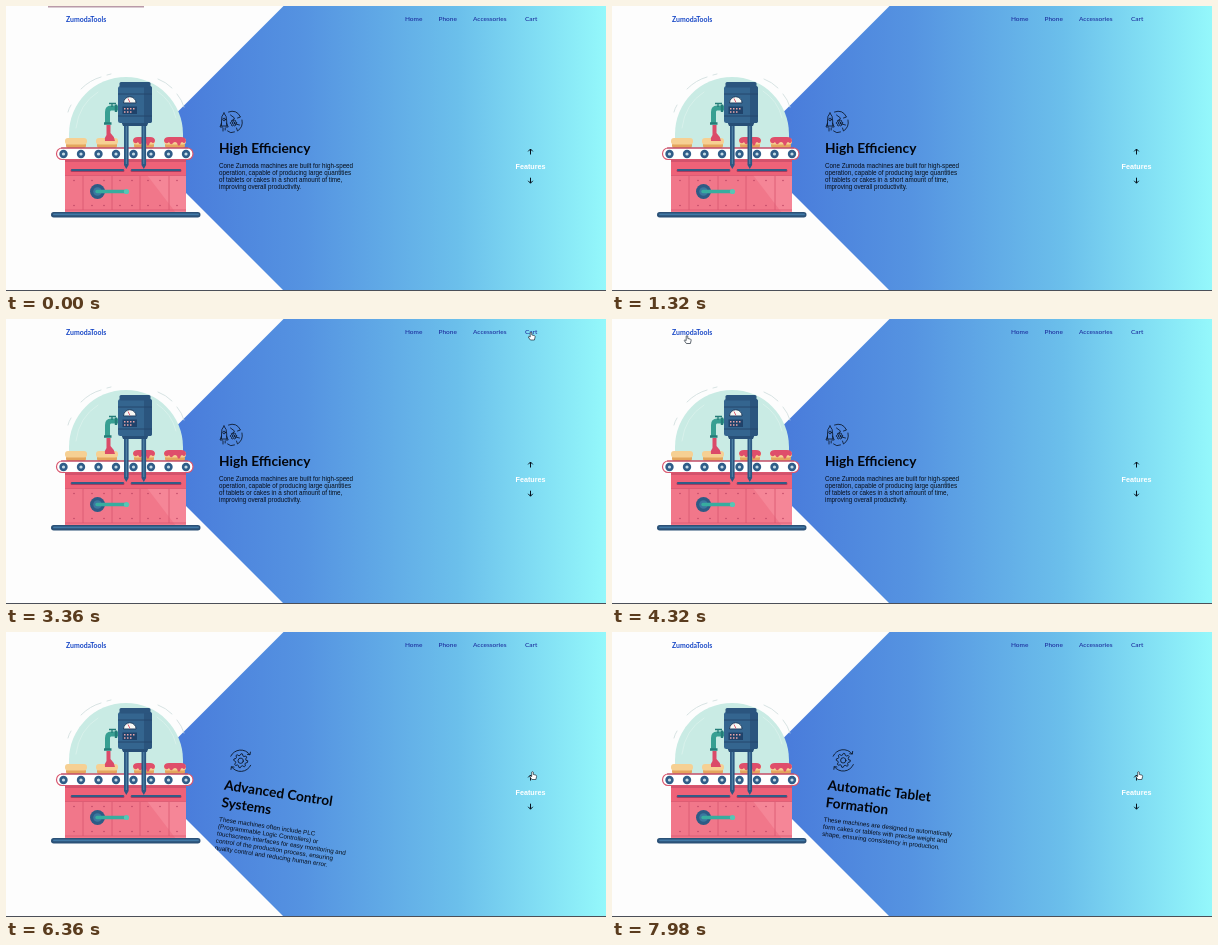
An HTML page for the animation above (8000 ms loop, 600 px wide and 285 px high).

```html
<!DOCTYPE html>
<html lang="en">
<head>
<meta charset="utf-8">
<title>Product features</title>
<style>
  html, body { margin: 0; width: 100%; height: 100%; overflow: hidden; background: #fdfdfd; }
  svg { display: block; width: 100%; height: 100%; }
  text { white-space: pre; }
  .brand, .nav, .head { font-family: Lato, "Open Sans", sans-serif; }
  .brand { font-size: 6.9px; font-weight: 700; fill: #1747c6; }
  .nav { font-size: 6.5px; fill: #1b2c9c; font-weight: 500; }
  .head { font-size: 13.700px; font-weight: 700; fill: #03060c; }
  .body { font: 6.28px "Liberation Sans", Arial, sans-serif; fill: #060d18; }
  .label { font: 700 7.2px "Liberation Sans", Arial, sans-serif; fill: #fff; }
  .icon { fill: none; stroke: #081220; stroke-width: .8; stroke-linecap: round; stroke-linejoin: round; }
  .arrow { fill: none; stroke: #07121e; stroke-width: 1; }
</style>
</head>
<body>
<svg viewBox="0 0 600 285" preserveAspectRatio="none">
  <defs>
    <linearGradient id="sky" gradientUnits="userSpaceOnUse" x1="136" x2="600" y1="0" y2="0">
      <stop offset="0" stop-color="#4675d9"/>
      <stop offset=".35" stop-color="#5593e1"/>
      <stop offset=".68" stop-color="#6bbfeb"/>
      <stop offset="1" stop-color="#94f8fb"/>
    </linearGradient>
    <clipPath id="wedge"><path d="M135.250 142.250L277.500 0H600V285H278Z"/></clipPath>
  </defs>

  <rect width="600" height="285" fill="#fdfdfd"/>
  <path d="M135.250 142.250L277.500 0H600V285H278Z" fill="url(#sky)"/>
  <g clip-path="url(#wedge)">
    <g transform="translate(136 142.5)"><g id="wheel"></g></g>
  </g>

  <g id="machine">
    <g fill="none" stroke="#cfdcdc" stroke-width=".8" stroke-linecap="round">
      <path d="M75 83Q84 74 95 71M101 69l4-1M152 73q8 3 14 9M171 88q5 6 7 13M62 106q1-4 3-7"/>
    </g>
    <path d="M63 143V128A57 57 0 0 1 177 128V143Z" fill="#c9ebe4"/>
    <path d="M70 122Q73 98 92 86M151 85Q166 95 170 112" fill="none" stroke="#d8f1eb" stroke-width="1" stroke-linecap="round"/>
    <g id="cakes"></g>

    <rect x="59" y="152" width="121" height="55" fill="#ee6278"/>
    <rect x="59" y="169" width="121" height="38" fill="#f1778a"/>
    <path d="M141 169H180V207H170Z" fill="#f58697"/>
    <path d="M59 152H180V156H59Z" fill="#d3526c"/>
    <path d="M59 169.500H180M59 204H180M77 170V204M106 170V204M134 170V204M163 170V204" stroke="#d9576f" stroke-width=".8"/>
    <g id="rivets" fill="#b53f5f"></g>
    <path d="M66 164.500H117M126 164.500H174" stroke="#a83c60" stroke-width="3" stroke-linecap="round"/>
    <path d="M66 164H117M126 164H174" stroke="#315c86" stroke-width="1.800" stroke-linecap="round"/>

    <rect x="50.500" y="142" width="136.500" height="11.500" rx="5.700" fill="#fff" stroke="#d9566e" stroke-width="1.200"/>
    <path d="M55 142H182" stroke="#b94a66" stroke-width="1.200"/>
    <g id="rollers"></g>

    <rect x="45" y="206" width="149.500" height="5.500" rx="2.700" fill="#2b5177"/>
    <path d="M48 208.400H192" stroke="#4279a6" stroke-width="1.800" stroke-linecap="round"/>

    <circle cx="91.500" cy="185.500" r="7.500" fill="#2d5b85"/>
    <circle cx="91.500" cy="185.500" r="4.300" fill="#3c779f"/>
    <path d="M91 185.500H120" stroke="#37ad9f" stroke-width="3.400" stroke-linecap="round"/>
    <circle cx="120.500" cy="185.500" r="2.600" fill="#57c6b5"/>

    <path d="M114 102H105Q101.500 102 101.500 106V118" fill="none" stroke="#389f92" stroke-width="5"/>
    <path d="M98 117.500H105.500M110 98.500V106" stroke="#247c78" stroke-width="2.400"/>
    <path d="M106 101V97.500M103 97.500H110" stroke="#247c78" stroke-width="1.300"/>
    <path d="M100.500 119H104.500V127Q108 130 109 135H99Q98 132 100.500 129Z" fill="#db4a69"/>

    <path d="M118 118H122.600V159L120.300 163L118 159ZM135.500 118H140.100V159L137.800 163L135.500 159Z" fill="#2c5882"/>
    <path d="M120.300 119V158M137.800 119V158" stroke="#5b8fb0" stroke-width=".9"/>
    <path d="M115 115H143L141 120H117Z" fill="#274f77"/>
    <rect x="112" y="80" width="34" height="37" rx="2.500" fill="#34658f"/>
    <path d="M138 80H144Q146 80 146 83V114Q146 117 144 117H138Z" fill="#2b557e"/>
    <rect x="113.500" y="76" width="31" height="5.500" rx="1.500" fill="#2b557e"/>
    <path d="M112 88H146M112 110H146" stroke="#24476d" stroke-width="1"/>
    <path d="M117.500 97A6.300 6.300 0 0 1 130.100 97Z" fill="#f7f8f4" stroke="#1f3e60" stroke-width="1"/>
    <path d="M124 96.500L122 92.500" stroke="#d84c66" stroke-width=".9"/>
    <rect x="116.500" y="100.500" width="14.500" height="7.500" fill="#1f426a"/>
    <path d="M118 102.700H130M118 106H127" stroke="#e9a6aa" stroke-width="1.500" stroke-dasharray="1.500 1.500"/>
  </g>

  <text class="brand" x="60" y="15.500">ZumodaTools</text>
  <g id="nav"></g>

  <text class="label" x="509.500" y="163.300">Features</text>
  <path class="arrow" d="M524.500 148.500V143M522.200 145.400L524.500 143L526.800 145.400"/>
  <path class="arrow" d="M524.500 171.700V177.200M522.200 174.800L524.500 177.200L526.800 174.800"/>

  <path d="M0 284.500H600" stroke="#4b4f58"/>
  <path id="edge" d="M42 .8H138" stroke="#b99aa8" stroke-width="1.500"/>

  <g id="cursor">
    <path id="pointer" d="M0 0V6L1.400 4.800L2.400 6.900L3.400 6.400L2.500 4.400H4.200Z" fill="#fff" stroke="#34495c" stroke-width=".6"/>
    <path id="hand" d="M-.8 .6Q0-.4.800.6V3L3.500 3.600Q4.300 4 4.100 5L3.400 8H-.6L-2.800 5Q-2.600 3.900-.8 5Z" fill="#fff" stroke="#1c2733" stroke-width=".7"/>
  </g>
</svg>

<script>
const LOOP = 8000, TICK = 60, TURN = 700;
const $ = id => document.getElementById(id);
const fill = (id, html) => { $(id).innerHTML = html; };

const gear = (r, teeth) => {
  const points = [];
  for (let i = 0; i < teeth * 4; i++) {
    const a = (i - .5) / (teeth * 4) * 2 * Math.PI;
    const d = i % 4 < 2 ? r : r * .76;
    points.push(`${(d * Math.cos(a)).toFixed(2)},${(d * Math.sin(a)).toFixed(2)}`);
  }
  return `<polygon points="${points.join(' ')}"/><circle r="${r * .38}"/>`;
};

const icons = {
  rocket: `<path d="M-7.500-9Q-4.500-6-4.800-1V4H-10V-1Q-10.500-6-7.500-9ZM-10 1L-11.500 5H-9M-5 1L-3.300 5H-5.500M-8.500 6V9M-6.300 6V8"/>
    <circle cx="-7.400" cy="-2.500" r="1.300"/>
    <path d="M-3-10Q5-13 9-5L6-4M10.500-2Q12 5 6 9L5 6M3 10Q-1 12-4 9M-1-7L3-4L1-1M4 2L8 3"/>
    <g transform="translate(2 1)">${gear(3.2, 6)}</g>`,
  gear: `${gear(7, 8)}
    <path d="M-10.500-3A11 11 0 0 1 8-7.500M8.300-10V-7.300H5.600M10.500 3A11 11 0 0 1-8 7.500M-8.300 10V7.300H-5.600"/>`,
  hand: `<path d="M-11 2H-8V10H-11ZM-8 3Q-4 1-1 4H3Q5 5 3 7H-2M4 6L9 2Q11 2 10 4L4 10H-8"/>
    <g transform="translate(1-3)">${gear(4.5, 7)}</g>
    <circle cx="-6" cy="-5" r="1.700"/><circle cx="7" cy="-8" r="2"/><circle cx="9" cy="-2" r="1.200"/><circle cx="-3" cy="-10" r="1"/>`
};

const features = [
  { icon: 'rocket', dx: 0, dy: 0, head: ['High Efficiency'], body: [
    'Cone Zumoda machines are built for high-speed',
    'operation, capable of producing large quantities',
    'of tablets or cakes in a short amount of time,',
    'improving overall productivity.'] },
  { icon: 'gear', dx: 6, dy: -2, head: ['Advanced Control', 'Systems'], body: [
    'These machines often include PLC',
    '(Programmable Logic Controllers) or',
    'touchscreen interfaces for easy monitoring and',
    'control of the production process, ensuring',
    'quality control and reducing human error.'] },
  { icon: 'hand', dx: 0, dy: -1, head: ['Hygienic Design'], body: [
    'The equipment is made from materials that are',
    'easy to clean and sanitize, meeting',
    'strict hygiene standards.'] },
  { icon: 'gear', dx: 3.5, dy: 1.5, head: ['Automatic Tablet', 'Formation'], body: [
    'These machines are designed to automatically',
    'form cakes or tablets with precise weight and',
    'shape, ensuring consistency in production.'] }
];

const HEAD_STEP = 17.5;
const lines = (list, cls, y, step) => list.map((s, i) =>
  `<text class="${cls}" x="77" y="${y + i * step}">${s}</text>`).join('');

fill('wheel', features.map((f, i) => `
  <g transform="rotate(${i * 90}) translate(${f.dx} ${f.dy})">
    <g class="icon" transform="translate(89.500 -26.500)">${icons[f.icon]}</g>
    ${lines(f.head, 'head', 4.5, HEAD_STEP)}
    ${lines(f.body, 'body', 19 + (f.head.length - 1) * HEAD_STEP, 7.2)}
  </g>`).join(''));

fill('nav', [['Home', 399], ['Phone', 432.5], ['Accessories', 467], ['Cart', 519]]
  .map(([s, x]) => `<text class="nav" x="${x}" y="15.300">${s}</text>`).join(''));

fill('rollers', Array.from({ length: 8 }, (_, i) => {
  const x = 57.5 + i * 17.5;
  return `<circle cx="${x}" cy="148" r="4.200" fill="#2f5d88"/><circle cx="${x}" cy="148" r="1.600" fill="#c4dbe6"/>`;
}).join(''));

fill('rivets', [68, 86, 98, 114, 126, 142, 154, 171].map(x =>
  `<circle cx="${x}" cy="174.500" r=".7"/><circle cx="${x}" cy="199.500" r=".7"/>`).join(''));

const bun = `<rect x="1" y="6" width="20" height="5" rx="2" fill="#e4a65d"/>
  <rect y="1" width="22" height="6.500" rx="3" fill="#f6d093"/>`;
const icing = `<path d="M0 4Q0 0 5 0H17Q22 0 22 4Q21 7 19 5.500Q17 4 16 8Q14 10 13 6Q11 4 9 6Q7 9 5 5Q2 8 0 4Z" fill="#df4e6b"/>`;
fill('cakes', [59, 90, 127, 158].map((x, i) =>
  `<g transform="translate(${x} 131)">${bun}${i > 1 ? icing : ''}</g>`).join(''));

// The CSS "ease" curve, cubic-bezier(.25, .1, .25, 1).
const bezier = (a, b, u) => 3 * a * u * (1 - u) ** 2 + 3 * b * u * u * (1 - u) + u ** 3;
const ease = p => {
  if (p <= 0 || p >= 1) return p <= 0 ? 0 : 1;
  let lo = 0, hi = 1;
  for (let i = 0; i < 20; i++) {
    const mid = (lo + hi) / 2;
    if (bezier(.25, .25, mid) < p) lo = mid; else hi = mid;
  }
  return bezier(.1, 1, lo);
};
const smooth = p => p * p * (3 - 2 * p);
const linear = p => p;

const turns = [5920, 6729, 7511];
const wheelAngle = t => -90 * turns.reduce((sum, start) => sum + ease((t - start) / TURN), 0);

// ms, x, y, easing towards the next stop
const stops = [
  [0, 500, -12, linear], [1500, 500, -12, linear], [1740, 490, 20, smooth],
  [2400, 413.5, 34, linear], [2580, 407, 13, linear], [2850, 441, 13, linear],
  [3100, 485, 13, linear], [3360, 525, 13, linear], [3480, 525, 13, smooth],
  [4200, 75, 16.5, linear], [4440, 75, 16.5, smooth], [5040, 526.5, 139.5, linear],
  [LOOP, 526.5, 139.5, linear]
];
const cursorAt = t => {
  const i = stops.findIndex(s => s[0] > t);
  const [t0, x0, y0, easing] = stops[i - 1];
  const [t1, x1, y1] = stops[i];
  const p = easing((t - t0) / (t1 - t0));
  return [x0 + (x1 - x0) * p, y0 + (y1 - y0) * p];
};
const overLink = t => [[2560, 3560], [4180, 4520], [5000, LOOP]].some(([a, b]) => t >= a && t < b);
const show = (id, on) => $(id).setAttribute('opacity', on ? 1 : 0);

const begin = performance.now();
function draw(now) {
  const elapsed = Math.max(0, now - begin) % LOOP;
  const t = Math.floor(elapsed / TICK) * TICK;
  $('wheel').setAttribute('transform', `rotate(${wheelAngle(t)})`);
  $('cursor').setAttribute('transform', `translate(${cursorAt(t)})`);
  show('hand', overLink(t));
  show('pointer', !overLink(t));
  show('edge', t < TICK);
  requestAnimationFrame(draw);
}
draw(begin);
</script>
</body>
</html>
```
